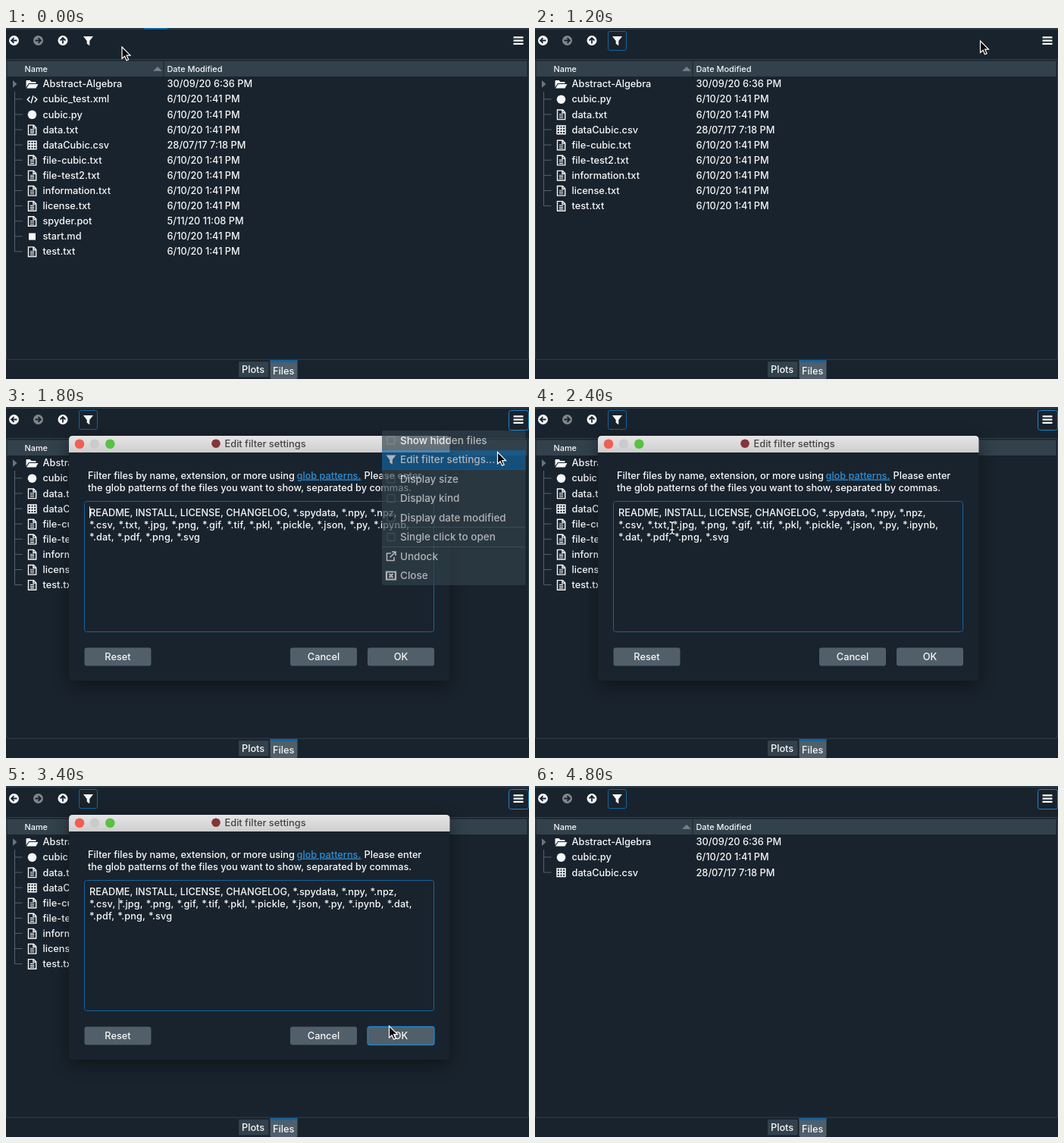
An HTML page that plays this animation: 690 px wide and 463 px high, repeating every 5400 ms.

```html
<!DOCTYPE html>
<html lang="en">
<head>
<meta charset="utf-8">
<title>File filter</title>
<style>
html, body { margin: 0; width: 100%; height: 100%; overflow: hidden; background: #19232d; }
svg { display: block; font-family: Inter, "Open Sans", sans-serif; font-weight: 500; }
.dialog { filter: drop-shadow(0 6px 11px rgba(0, 0, 0, .45)); }
.globs { letter-spacing: .15px; word-spacing: .6px; }
</style>
</head>
<body>
<svg id="stage" width="690" height="463" viewBox="0 0 690 463"></svg>
<script>
const LOOP = 5400, STEP = 200;
const BG = '#19232d', PANEL = '#32414b', BLUE = '#1464a0', BRIGHT = '#1a86cc', BUTTON = '#505f69', WHITE = '#f6f7f8';

const text = (x, y, s, size = 12.75, fill = WHITE, extra = '') =>
  `<text x="${x}" y="${y}" font-size="${size}" fill="${fill}" ${extra}>${s}</text>`;
const rect = (x, y, w, h, fill, r = 0, extra = '') =>
  `<rect x="${x}" y="${y}" width="${w}" height="${h}" rx="${r}" fill="${fill}" ${extra}/>`;
const frame = (x, y, w, h, color, r = 0) => rect(x, y, w, h, 'none', r, `stroke="${color}"`);
const disc = (x, y, r, fill) => `<circle cx="${x}" cy="${y}" r="${r}" fill="${fill}"/>`;
const line = (d, color = WHITE, w = 1) =>
  `<path d="${d}" fill="none" stroke="${color}" stroke-width="${w}"/>`;
const fill = (d, color = WHITE) => `<path d="${d}" fill="${color}"/>`;
const at = (x, y, s) => `<g transform="translate(${x} ${y})">${s}</g>`;

// Icons are centred on 0,0
const funnel = fill('M-6.5 -6H6.5L1.8 0V6.3L-1.8 3.8V0Z');
const icons = {
  folder: fill('M-8 4V-4q0-1 1-1h4l2 2h5q1 0 1 1v1H-4.5Z') + fill('M-4 0H8L5 5.5H-7.5Z'),
  code: line('M-3 -3.5L-6.3 0L-3 3.5M3 -3.5L6.3 0L3 3.5M1.5 -5L-1.5 5', WHITE, 1.5),
  py: disc(0, 0, 5.8, WHITE),
  md: rect(-4.5, -4.5, 9, 9, WHITE),
  doc: line('M-5 -6.3H2L5.2 -3V6.3H-5ZM1.5 -6V-2.5H5', WHITE, 1.4) +
    line('M-2.6 -.5H2.8M-2.6 1.7H2.8M-2.6 4H2.8', WHITE, 1.1),
  grid: line('M-5.5 -5.3H5.5V5.3H-5.5ZM-5.5 -1.8H5.5M-5.5 1.8H5.5M-1.8 -5.3V5.3M1.8 -5.3V5.3', WHITE, 1.5)
};

const OCT = '6/10/20 1:41 PM';
const allFiles = [
  ['folder', 'Abstract-Algebra', '30/09/20 6:36 PM'],
  ['code', 'cubic_test.xml', OCT],
  ['py', 'cubic.py', OCT],
  ['doc', 'data.txt', OCT],
  ['grid', 'dataCubic.csv', '28/07/17 7:18 PM'],
  ['doc', 'file-cubic.txt', OCT],
  ['doc', 'file-test2.txt', OCT],
  ['doc', 'information.txt', OCT],
  ['doc', 'license.txt', OCT],
  ['doc', 'spyder.pot', '5/11/20 11:08 PM'],
  ['md', 'start.md', OCT],
  ['doc', 'test.txt', OCT]
];
const filtered = allFiles.filter(f => !/xml|pot|md$/.test(f[1]));
const noText = filtered.filter(f => !f[1].endsWith('.txt'));

function toolbar(i) {
  const arrow = (x, color, turn) => at(x, 16.5, disc(0, 0, 6.5, color) +
    `<g transform="rotate(${turn})">${line('M4 0H-3M0 -3.4L-3.4 0L0 3.4', BG, 1.8)}</g>`);
  let s = rect(0, .5, 690, 1.5, PANEL);
  if (i < 1) s += rect(182, 0, 31, 2, BLUE, 1);
  s += arrow(10.5, WHITE, 0) + arrow(42.5, '#7f868c', 180) + arrow(75, WHITE, 90);
  if (i > 1) s += frame(96.5, 4.5, 24, 25, BLUE, 2.5);
  if (i > 6) s += frame(663.5, 4.5, 26, 26, BRIGHT, 3);
  s += at(108.5, 17, funnel);
  for (const y of [11.3, 15.5, 19.8]) s += rect(669.5, y, 13, 2.2, WHITE, .5);
  return s;
}

function fileList(files, focused) {
  const rowY = n => 73.8 + n * 20.1;
  let s = frame(.5, 41.5, 689, 395.7, focused ? BRIGHT : PANEL, 2) +
    rect(1.5, 43.5, 686, 20.5, PANEL) + rect(207.5, 43.5, 1, 20.5, BG) +
    fill('M194 56.8L200 51L206 56.8Z', '#76828a') +
    text(24.5, 58, 'Name', 10.9) + text(212.5, 58, 'Date Modified', 10.9) +
    fill('M9 69L14.5 74L9 79Z', '#6b757d') +
    line(`M11.5 84V${rowY(files.length - 1)}`, '#56616a');
  files.forEach(([icon, name, date], n) => {
    const y = rowY(n);
    if (n) s += line(`M11.5 ${y}H21.5`, '#56616a');
    s += at(34.5, y + .3, icons[icon]) + text(48.5, y + 4.5, name) + text(212.5, y + 4.5, date);
  });
  return s;
}

const tabs = rect(307, 440, 39.5, 20.5, PANEL, 1) + text(311, 455, 'Plots') +
  rect(348.5, 438, 36, 25, BUTTON, 2) + rect(348.5, 438, 36, 3, BLUE) + text(352, 457, 'Files');

function dialog(i) {
  const deleted = i >= 15;
  const button = (x, s, hot) =>
    rect(x, 317.5, 88, 24, BUTTON, 3, hot ? `stroke="${BRIGHT}" stroke-width="1.3"` : '') +
    text(x + 44, 334, s, 12.75, WHITE, 'text-anchor="middle"');
  const caret = (x, y) => rect(x, y, 1, 15, WHITE);
  const globs = (y, s) => text(110, y, s, 12.7, WHITE, 'class="globs"');
  const head = '*.jpg, *.png, *.gif, *.tif, *.pkl, *.pickle, *.json, *.py, *.ipynb,';
  const rows = deleted
    ? ['*.csv, ' + head + ' *.dat,', '*.pdf, *.png, *.svg']
    : ['*.csv, *.txt, ' + head, '*.dat, *.pdf, *.png, *.svg'];
  let s = '<g class="dialog">' + rect(83, 38, 502.5, 323, BG, 5) + '</g>' +
    fill('M83 60V43q0-5 5-5H580.5q5 0 5 5V60Z', 'url(#bar)') +
    disc(97, 48.8, 6.3, '#f25e54') + disc(117, 48.8, 6.3, '#cbcbcb') + disc(137.3, 48.8, 6.3, '#57c244') +
    disc(277, 48.2, 5.8, '#83363a') + text(288.5, 53.3, 'Edit filter settings', 12.8, '#444') +
    text(108, 94.5, 'Filter files by name, extension, or more using') +
    text(383.5, 94.5, 'glob patterns.', 12.75, '#2d8fd6', 'text-decoration="underline"') +
    text(472.5, 94.5, 'Please enter') +
    text(108, 110.5, 'the glob patterns of the files you want to show, separated by commas.') +
    frame(103.5, 124.5, 461, 172, BLUE, 3);
  if (i === 13) s += rect(156, 148, 26, 15.5, BLUE);
  if (i === 14) s += rect(148, 148, 34, 15.5, BLUE);
  s += text(110, 143.8, 'README, INSTALL, LICENSE, CHANGELOG, *.spydata, *.npy, *.npz,') +
    globs(160, rows[0]) + globs(176, rows[1]);
  if (i === 9 || i === 11) s += caret(110, 131.5);
  if (deleted) s += caret(148.5, 148);
  return s + button(103.5, 'Reset') + button(375, 'Cancel') + button(477, 'OK', i === 17);
}

function menu(hot, opacity) {
  const names = ['Show hidden files', 'Edit filter settings...', 'Display size', 'Display kind',
    'Display date modified', 'Single click to open', 'Undock', 'Close'];
  const box = frame(-5, -5, 10, 10, '#5f6d77', 1);
  const marks = [box, funnel, box, box, box + line('M-3 0L-1 2.5L3.5 -3', BG, 1.5), box,
    line('M0 -4H-5.5V5.5H4V1M1 -6H6V-1M6 -6L-1.5 1.5', WHITE, 1.6),
    line('M-6 -5H6V5H-6ZM-2.5 -2.5L2.5 2.5M2.5 -2.5L-2.5 2.5', WHITE, 2.2)];
  let s = rect(496, 31, 189.5, 204, PANEL, 2);
  if (hot >= 0) s += rect(496, 31.5 + hot * 25.5, 189.5, 25, BLUE);
  s += line('M496 82.5H685M496 158.5H685M496 184.5H685', BUTTON);
  names.forEach((name, n) => {
    const y = 44 + n * 25.5;
    s += at(508, y, marks[n]) + text(520, y + 4.8, name, 13.5);
  });
  return `<g opacity="${opacity}">${s}</g>`;
}

// Pointer positions: first step, x, y
const pointer = [[0, 153, 25], [2, 118, 17], [3, 107, 15], [5, 111, 16], [6, 587.5, 17], [7, 673, 18],
  [8, 650, 52], [9, 648.5, 59.5], [10, 451, 49], [11, 236, 162.5], [12, 181, 159.5], [13, 157, 159],
  [14, 149, 159], [16, 430, 266], [17, 505.5, 316.5]];

function cursor(i) {
  if (i >= 24) return '';
  const [, x, y] = pointer.findLast(p => p[0] <= i);
  const beam = 'M-3.5 -8Q0 -8 0 -5.5V5.5Q0 8 -3.5 8M3.5 -8Q0 -8 0 -5.5M0 5.5Q0 8 3.5 8M-2.5 2.5H2.5';
  return at(x, y, i >= 11 && i < 16
    ? line(beam, '#111', 3) + line(beam, WHITE, 1.3)
    : '<path d="M0 0V15.5L3.6 12.2L6 17.8L8.6 16.7L6.2 11.2H11Z" fill="#080808" stroke="#fff" stroke-width="1.2"/>');
}

function scene(i) {
  const files = i < 4 ? allFiles : i < 18 ? filtered : noText;
  let s = '<linearGradient id="bar" x2="0" y2="1"><stop stop-color="#e6e6e6"/><stop offset="1" stop-color="#cecece"/></linearGradient>' +
    rect(0, 0, 690, 463, BG) + toolbar(i) + fileList(files, i >= 18 && i < 24) + tabs;
  if (i >= 9 && i < 18) s += dialog(i);
  if (i >= 7 && i < 10) s += menu(i - 8, i === 9 ? .68 : 1);
  return s + cursor(i);
}

const stage = document.getElementById('stage');
let shown = -1;
function tick() {
  const i = Math.floor(performance.now() % LOOP / STEP);
  if (i !== shown) stage.innerHTML = scene(shown = i);
  requestAnimationFrame(tick);
}
tick();
</script>
</body>
</html>
```
